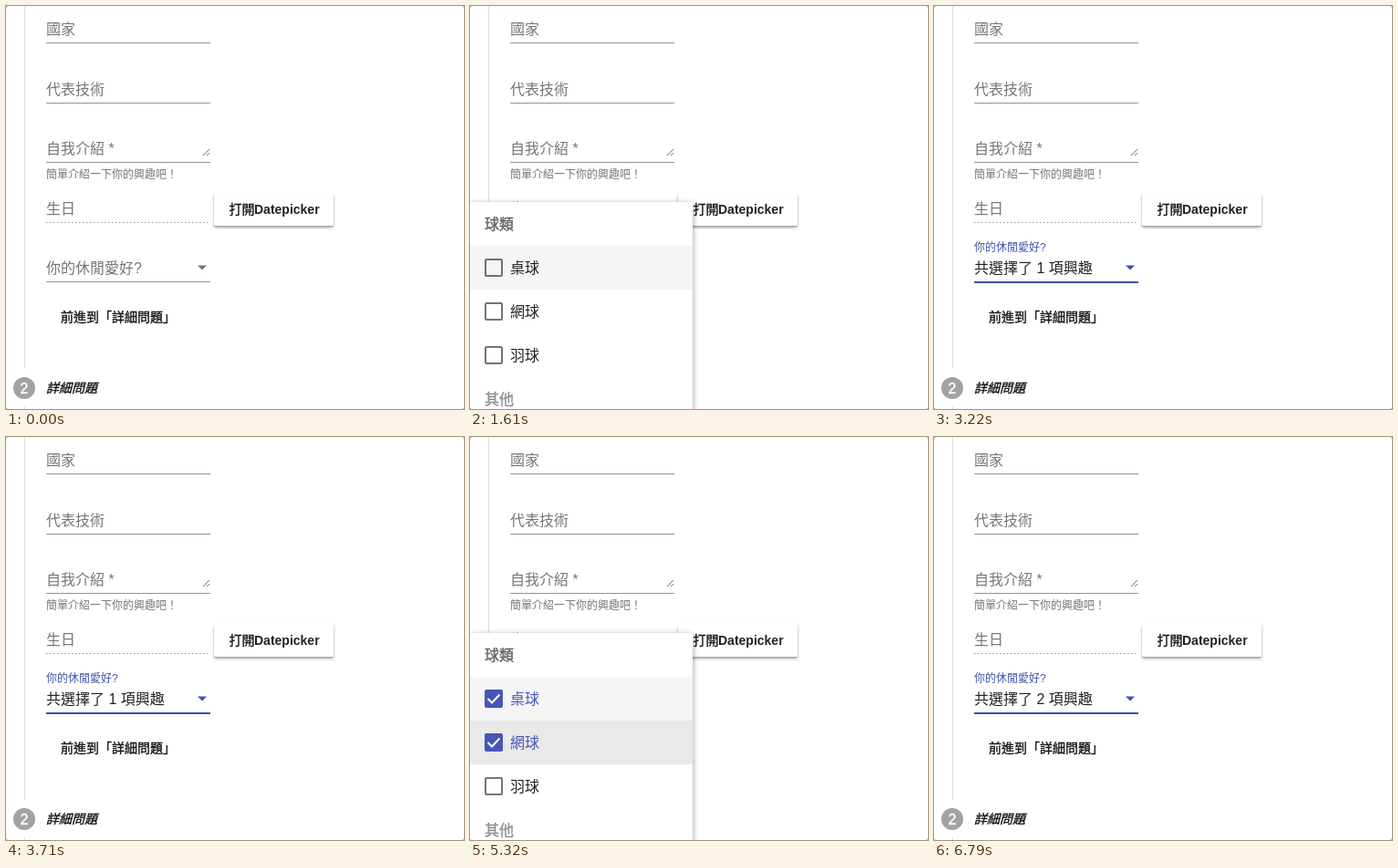
An HTML page with a canvas that plays this animation: 502x442 px, repeating every 7.07 s.

```html
<!DOCTYPE html>
<html lang="zh-TW">
<head>
<meta charset="utf-8">
<title>Select demo</title>
<style>
html, body { margin: 0; width: 100%; height: 100%; overflow: hidden; background: #aaa; }
canvas { display: block; width: 502px; height: 442px; }
</style>
</head>
<body>
<canvas id="stage" width="502" height="442"></canvas>
<script>
const ctx = document.getElementById('stage').getContext('2d');
const LOOP = 7070, STEP = 70;
const FONT = '"Liberation Sans", "Noto Sans CJK TC", "Noto Sans CJK", sans-serif';
const INK = 'rgba(0,0,0,.87)', SOFT = 'rgba(0,0,0,.54)', RULE = 'rgba(0,0,0,.42)', PALE = 'rgba(0,0,0,.38)';
const BLUE = [63, 82, 168], GREY = [117, 117, 117];
const PRIMARY = `rgb(${BLUE})`, CHECK = '#4556b6';
const ROW = 48, TOP = 215, PIVOT = 287;

const clamp = v => Math.max(0, Math.min(1, v));
const easeOut = v => 1 - (1 - clamp(v)) ** 3;
const mix = (a, b, p) => a + (b - a) * p;
const blend = p => `rgb(${GREY.map((g, i) => Math.round(mix(g, BLUE[i], p)))})`;

function rect(x, y, w, h, color) {
  ctx.fillStyle = color;
  ctx.fillRect(x, y, w, h);
}

// y is the visual middle of the line
function text(str, x, y, size, color, style = '') {
  ctx.font = `${style} ${size}px ${FONT}`;
  ctx.fillStyle = color;
  ctx.fillText(str, x, y + size * 0.37);
}

// medium weight: regular glyphs with a thin outline
function medium(str, x, y, size, color, style = '') {
  text(str, x, y, size, color, style);
  ctx.strokeStyle = color;
  ctx.lineWidth = 0.4;
  ctx.strokeText(str, x, y + size * 0.37);
}

function stroke(points, color, width) {
  ctx.beginPath();
  points.forEach(([x, y]) => ctx.lineTo(x, y));
  ctx.strokeStyle = color;
  ctx.lineWidth = width;
  ctx.stroke();
}

function shadow(color, blur, y) {
  ctx.shadowColor = color;
  ctx.shadowBlur = blur;
  ctx.shadowOffsetY = y;
}

function field(label, y) {
  text(label, 44, y, 16, SOFT);
  rect(44, y + 15, 180, 1, RULE);
}

function drawSelect(t) {
  const focus = easeOut((t - 1100) / 240);
  const lift = easeOut((t - 1240) / 400);
  const count = t >= 5180 ? 2 : t >= 2660 ? 1 : 0;
  const color = blend(focus);

  text('你的休閒愛好?', 44, mix(287, 265, lift), mix(16, 12, lift), color);
  if (count) text(`共選擇了 ${count} 項興趣`, 44, 287, 16, INK);
  rect(44, 302, 180, 1, RULE);
  rect(134 - 90 * focus, 302, 180 * focus, 2, PRIMARY);

  ctx.beginPath();
  ctx.moveTo(210, 284.5);
  ctx.lineTo(220, 284.5);
  ctx.lineTo(215, 289.5);
  ctx.fillStyle = color;
  ctx.fill();
}

function drawPage(t) {
  rect(20, 0, 1, 398, '#dedede');
  rect(20, 439, 1, 3, '#dedede');
  field('國家', 25);
  field('代表技術', 91);
  field('自我介紹 *', 156);
  stroke([[216, 164], [223, 157]], '#777', 1);
  stroke([[220, 164], [223, 161]], '#777', 1);
  text('簡單介紹一下你的興趣吧！', 44, 185, 12, SOFT);

  text('生日', 44, 222, 16, SOFT);
  for (let x = 44; x < 224; x += 4) rect(x, 237, 1.5, 1, RULE);

  ctx.save();
  shadow('rgba(0,0,0,.4)', 3, 2);
  ctx.beginPath();
  ctx.roundRect(228, 205, 131, 36, 2);
  ctx.fillStyle = '#fff';
  ctx.fill();
  ctx.restore();
  medium('打開', 244.5, 223, 14, INK);
  text('Datepicker', 272, 223, 14, INK, 'bold');

  drawSelect(t);
  medium('前進到「詳細問題」', 60, 341, 14, INK);

  ctx.beginPath();
  ctx.arc(20, 419, 12, 0, 7);
  ctx.fillStyle = '#a2a2a2';
  ctx.fill();
  medium('2', 15.5, 419, 16, '#fff');
  medium('詳細問題', 44, 419, 14, INK, 'italic');
}

function drawOption(label, y, checked) {
  ctx.beginPath();
  if (checked) {
    ctx.roundRect(16, y - 10, 20, 20, 2);
    ctx.fillStyle = CHECK;
    ctx.fill();
    stroke([[19.5, y], [24, y + 4.5], [32.5, y - 4.5]], '#fff', 2);
  } else {
    ctx.roundRect(17, y - 9, 18, 18, 1);
    ctx.strokeStyle = SOFT;
    ctx.lineWidth = 2;
    ctx.stroke();
  }
  text(label, 44, y, 16, checked ? CHECK : INK);
}

function drawRipple(t, start, end, x, y, top) {
  if (t < start || t >= end) return;
  const u = clamp((t - start + STEP) / 240);
  ctx.save();
  ctx.beginPath();
  ctx.rect(0, top, 244, ROW);
  ctx.clip();
  ctx.beginPath();
  ctx.arc(x, y, 200 * (1 - (1 - u) ** 2), 0, 7);
  ctx.fillStyle = `rgba(0,0,0,${0.09 * clamp((end - t) / 250)})`;
  ctx.fill();
  ctx.restore();
}

// scale: opening progress, alpha: panel opacity
function drawPanel(t, scale, alpha) {
  const width = mix(180, 244, scale);
  const settled = alpha === 1 && scale > 0.9;
  ctx.save();
  ctx.globalAlpha = alpha;
  ctx.translate(0, PIVOT);
  ctx.scale(1, scale);
  ctx.translate(0, -PIVOT);

  // keep the shadow outside the translucent sheet
  ctx.save();
  ctx.beginPath();
  ctx.rect(-50, -400, 700, 1400);
  ctx.rect(0, TOP, width, 256);
  ctx.clip('evenodd');
  shadow('rgba(0,0,0,.4)', 7, 2);
  rect(0, TOP, width, 256, '#fff');
  ctx.restore();

  ctx.beginPath();
  ctx.rect(0, TOP, width, 256);
  ctx.clip();
  rect(0, TOP, width, 256, '#fff');

  if (settled) {
    rect(0, 263, width, ROW, '#f5f5f5');
    if (t > 4300 && t < 5670) rect(0, 311, width, ROW, '#f5f5f5');
  } else {
    rect(0, 263, t > 5900 ? 22 : 16, ROW, '#ececec');
  }
  drawRipple(t, 2520, 2870, 50, 296, 263);
  drawRipple(t, 5040, 5460, 52, 338, 311);

  medium('球類', 16, 239, 16, SOFT);
  drawOption('桌球', 287, t >= 2660);
  drawOption('網球', 335, t >= 5180);
  drawOption('羽球', 383, false);
  medium('其他', 16, 431, 16, PALE);
  drawOption('', 479, false);
  ctx.restore();
}

// opening and closing start times of the panel
const VISITS = [[1215, 2955], [4315, 5895]];

function draw(t) {
  ctx.save();
  ctx.clearRect(0, 0, 502, 442);
  ctx.beginPath();
  ctx.roundRect(0, 0, 502, 442, 3);
  ctx.clip();
  rect(0, 0, 502, 442, '#fff');
  drawPage(t);
  for (const [open, close] of VISITS) {
    const scale = easeOut((t - open) / 150);
    const alpha = scale * (1 - clamp((t - close) / 250));
    if (alpha > 0) drawPanel(t, scale, alpha);
  }
  ctx.restore();
}

const began = performance.now();
function tick() {
  const t = (performance.now() - began) % LOOP;
  draw(Math.floor(t / STEP) * STEP);
  requestAnimationFrame(tick);
}
tick();
</script>
</body>
</html>
```
